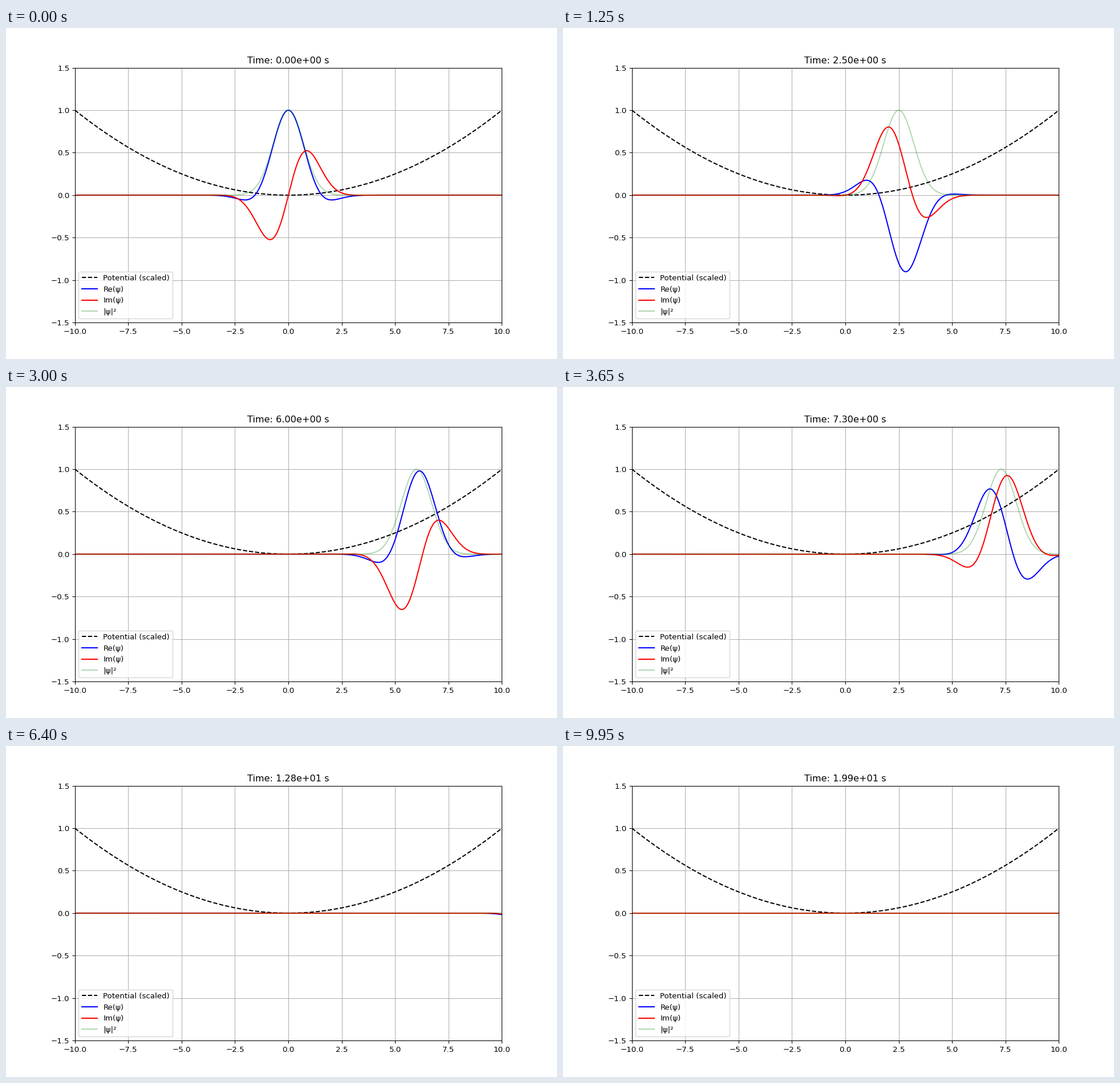
Write a matplotlib script that moves like this. It is 966 px wide and 580 px high and loops after 10 s.

```python
import numpy as np
import matplotlib.pyplot as plt
from matplotlib.animation import FuncAnimation

WIDTH, HEIGHT = 966, 580
DPI = 96.6      # makes the figure ten inches wide
EPS = 1e-3      # keeps the pixel size from being truncated downwards

FRAMES = 200
INTERVAL = 50   # ms
DT = 0.1        # simulated seconds per frame

K = 1.0         # wave number
SPEED = 1.0     # group velocity
SIGMA = 1.0     # packet width

plt.rcParams["font.family"] = "DejaVu Sans"

x = np.linspace(-10, 10, 1000)


def psi(t):
    """Gaussian envelope gliding over a fixed plane wave."""
    envelope = np.exp(-(x - SPEED * t) ** 2 / (2 * SIGMA ** 2))
    return envelope * np.exp(1j * K * x)


size = ((WIDTH + EPS) / DPI, (HEIGHT + EPS) / DPI)
fig, ax = plt.subplots(figsize=size, dpi=DPI)
ax.plot(x, x ** 2 / 100, "k--", label="Potential (scaled)")
re_line, = ax.plot([], [], color="blue", label="Re(ψ)")
im_line, = ax.plot([], [], color="red", label="Im(ψ)")
prob_line, = ax.plot([], [], color="green", alpha=0.3, label="|ψ|²")

ax.set_xlim(-10, 10)
ax.set_ylim(-1.5, 1.5)
ax.grid(True)
ax.legend(loc="lower left")
title = ax.set_title("")


def update(i):
    t = i * DT
    wave = psi(t)
    re_line.set_data(x, wave.real)
    im_line.set_data(x, wave.imag)
    prob_line.set_data(x, np.abs(wave) ** 2)
    title.set_text(f"Time: {t:.2e} s")
    return re_line, im_line, prob_line, title


anim = FuncAnimation(fig, update, frames=FRAMES, interval=INTERVAL,
                     init_func=lambda: update(0), repeat=True, repeat_delay=0)
plt.show()
```
